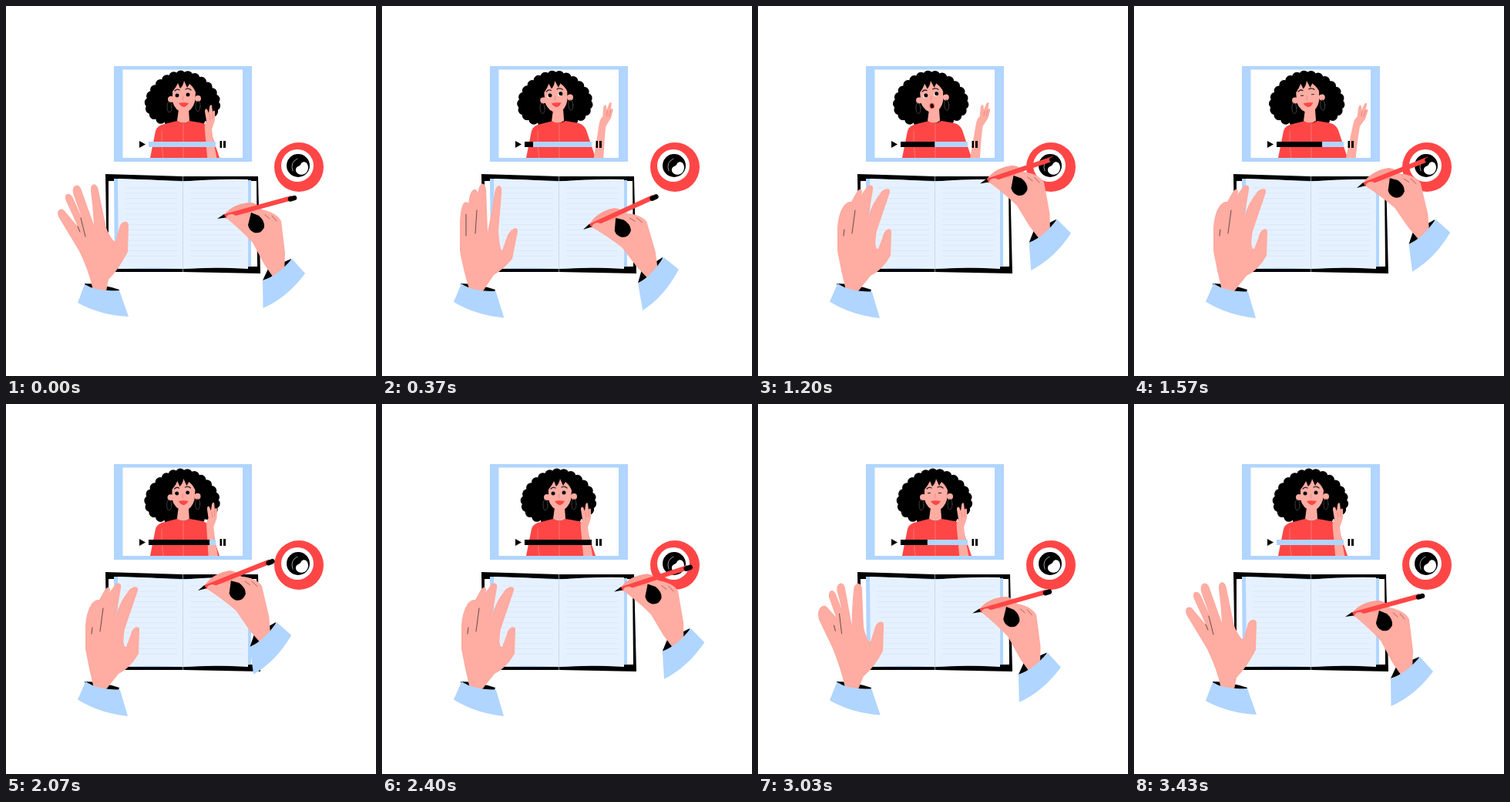
Animation, 480 px wide and 480 px high, one loop 3470 ms. Source, as an HTML page:

```html
<!DOCTYPE html>
<html lang="en">
<head>
<meta charset="utf-8">
<title>Online lesson</title>
<style>
  html, body { margin: 0; width: 100%; height: 100%; overflow: hidden; background: #fff; }
  svg { display: block; width: 100vw; height: 100vh; }
  .blue { fill: #b0d5ff; }
  .skin { fill: #ffaca2; }
  .shade { fill: #fb9f95; }
  .red { fill: #ff4646; }
  .white { fill: #fff; }
  .line { fill: none; stroke: #222; stroke-width: .7; stroke-linecap: round; }
</style>
</head>
<body>
<svg viewBox="0 0 480 480">
  <clipPath id="screen"><path d="M152 82.500H307V197H152Z"/></clipPath>

  <!-- video window -->
  <path class="blue" d="M140 78H319V202H140Z"/>
  <path class="white" d="M151.500 82.500H307V197H151.500Z"/>
  <g clip-path="url(#screen)">
    <g id="hair"></g>
    <path class="red" d="M187 197L194 162Q196 155 206 153L222 149Q230 154 238 149L255 152Q262 154 265 161L277 197Z"/>
    <path class="line" style="stroke:#ff8b85" d="M230 152V197M202 162Q201 180 204 197"/>
    <path id="neck" class="skin" d="M224 134H237L238 149Q230 154 222 149Z"/>
    <g id="head">
      <circle class="skin" cx="214" cy="121" r="4"/>
      <circle class="skin" cx="249" cy="120" r="4"/>
      <path class="skin" d="M216 111Q221 105 223 100L226 107Q230 103 231 97L235 106L238 101Q244 106 246 112L245 124Q242 136 231 139Q219 136 216 124Z"/>
      <path class="line" style="stroke-width:1.300" d="M219 110Q222 107 225 109M233 108Q237 106 240 109"/>
      <path class="line" style="stroke:#e8766f" d="M230 117Q228 122 230 122"/>
      <g id="eyes">
        <g class="white"><circle cx="222" cy="116" r="2.500"/><circle cx="236" cy="115" r="2.500"/></g>
        <g id="pupils"><circle cx="222" cy="116" r="2.500"/><circle cx="236" cy="115" r="2.500"/></g>
      </g>
      <path id="smile" class="red" d="M224 126Q230 124.500 237 126Q231 136 224 126Z"/>
      <ellipse id="talk" cx="230" cy="129.500" rx="2.700" ry="3.300" stroke="#ff4646"/>
      <g class="line" style="stroke:#555"><ellipse cx="212" cy="131" rx="3" ry="7"/><ellipse cx="249" cy="130" rx="3" ry="7"/></g>
    </g>
    <g id="arm" class="skin">
      <path d="M262 206L258 162Q257 152 260 149L258 137Q258 132 261 134L263 139L264 131Q265 127 267 129L268 137Q270 134 271 137L271 148Q269 154 267 160L269 174L275 206Z"/>
      <path class="line" style="stroke:#d9766f;stroke-width:.6" d="M264 140L265 147M268 138L268 146"/>
    </g>
  </g>
  <path d="M173 175L181 179.500L173 184ZM277.500 175H280V184H277.500ZM282 175H285V184H282Z"/>
  <path class="blue" d="M185 176H272V183H185Z"/>
  <rect id="progress" x="185" y="176" height="7"/>

  <!-- cup -->
  <circle class="red" cx="380" cy="209" r="32"/>
  <circle class="white" cx="378" cy="207" r="21"/>
  <circle cx="379" cy="207" r="15"/>
  <path class="white" d="M376 214C378 221 391 221 392 210C392 203 387 200 383 204C382 209 375 207 376 214Z"/>
  <path class="line" style="stroke:#fff;stroke-width:.6" d="M378 198Q368 203 372 214"/>

  <!-- notebook -->
  <path d="M129 218L229 221H327L330 347L230 345L131 345Z"/>
  <path class="white" d="M133 227H325L326 338L133 340Z"/>
  <path class="blue" d="M140 224L229 227L318 226V338L229 341L141 341Z"/>
  <path fill="#e6f1ff" d="M145 224Q190 225 229 228Q270 224 314 225V341Q270 338 229 341Q190 338 146 341Z"/>
  <path id="rules" class="line" style="stroke:#d9e4f2"/>
  <path class="line" style="stroke:#c3cedd" d="M229.500 221V345"/>

  <!-- resting hand -->
  <path d="M102 360Q122 360 147 368L144 376L105 368Z"/>
  <path id="palm" class="skin"/>
  <path id="creases" class="line"/>
  <path id="cuff" class="blue" d="M102 361Q118 371 147 369L159 403Q122 401 93 385Z"/>

  <!-- writing hand -->
  <g id="writer">
    <path d="M333 356L340 341L370 328L366 340L345 352Z"/>
    <path class="skin" d="M283 271Q295 256 318 255Q326 256 332 264Q351 268 357 279L362 320L361 347L346 351L335 335L320 307Q306 292 286 275Z"/>
    <path class="shade" d="M283 271Q295 256 318 255Q323 256 326 259L318 270L294 271Z"/>
    <path d="M318 268L328 272Q336 279 335 287Q331 296 322 294Q315 291 314 284Z"/>
    <path class="line" style="stroke:#8c4a45" d="M336 271L342 276M345 272L351 279"/>
    <path class="blue" d="M333 356Q352 350 371 328L388 347Q365 378 333.500 392Z"/>
    <path class="red" d="M283 270L370 246L371.500 252L285 275.500Z"/>
    <path d="M274 276L283 270L285 274.500Z"/>
    <path d="M369 250.500L374 249" stroke="#000" stroke-width="6.500" stroke-linecap="round"/>
    <path class="skin" d="M286 275Q286 270 294 270L308 277L306 291Z"/>
  </g>
</svg>
<script>
const LOOP = 3470;
const el = id => document.getElementById(id);
const set = (id, name, value) => el(id).setAttribute(name, value);
const clamp = u => Math.min(1, Math.max(0, u));
const ease = u => u * u * (3 - 2 * u);
const ramp = (t, from, to) => ease(clamp((t - from) / (to - from)));
const during = (t, from, to) => t >= from && t < to;
const lerp = (a, b, u) => a + (b - a) * u;

// Blends two paths that share the same commands.
function blend(a, b, u) {
  const ends = b.match(/[\d.]+/g);
  let i = 0;
  return a.replace(/[\d.]+/g, n => lerp(+n, +ends[i++], u).toFixed(2));
}

const spread = {
  palm: "M113 369Q108 345 95 318L69 275C63 264 73 260 77 267L93 286L78 253C74 242 83 241 87 249L98 274L87 243C85 231 95 229 98 239L114 284Q113 262 110 240C109 229 118 228 120 239L130 288Q138 306 142 305L147 288C149 278 160 277 159 286L158 319Q146 342 133 355L130 370Z",
  creases: "M93 286L96 293M97 275L103 299"
};
const closing = {
  palm: "M113 367Q106 345 101 318L101 282C102 258 106 252 111 255L112 256L113 249C115 238 121 235 123 240L124 242L125 238C127 228 134 227 135 240L137 293Q143 264 146 242C148 230 156 230 155 242L151 292Q153 318 156 317L162 300C167 287 177 285 176 293L169 328Q157 342 145 349L131 370Z",
  creases: "M109 270L109 298M123 265L121 295"
};
const resting = {
  palm: "M114 369Q108 345 103 318L103 290C104 268 111 255 119 254L121 254L126 245C130 237 135 235 135 242L134 245L139 238C143 230 151 231 149 239L140 292Q143 262 158 244C162 236 173 235 171 242L154 292Q150 316 156 315L162 299C164 288 174 286 173 294L172 324Q161 343 146 350L130 370Z",
  creases: "M112 290L111 298M126 265L122 295"
};

// Pencil tip: time, x, y, turn, half strokes written until the next stop
const stops = [
  [0, 274, 276, 0, 0], [370, 261, 290, -9.2, 0], [830, 242, 229, -3.8, 6],
  [1400, 306, 232, -4, 0], [1570, 289, 236, -6.4, 0], [2070, 249, 242, -6.3, 5],
  [2520, 312, 246, -4, 0], [2730, 286, 263, -1.5, 0], [3230, 274, 276, 0, 0], [LOOP, 274, 276, 0, 0]
];

function drawWriter(t) {
  const i = stops.findIndex((s, k) => t < stops[k + 1][0]);
  const [from, to] = [stops[i], stops[i + 1]];
  const u = (t - from[0]) / (to[0] - from[0]);
  const [x, y, turn] = [1, 2, 3].map(k => lerp(from[k], to[k], ease(u)));
  const stroke = Math.sin(Math.PI * from[4] * u);
  set("writer", "transform", `translate(${x - 274} ${y - 276 + 2 * stroke}) rotate(${turn - 2 * stroke} 274 276)`);
}

function drawPalm(t) {
  const shut = ramp(t, 0, 580), open = ramp(t, 2550, 3300);
  for (const part of ["palm", "creases"]) {
    const [s, c, r] = [spread[part], closing[part], resting[part]];
    set(part, "d", open > 0 ? blend(r, s, open)
      : shut < .7 ? blend(s, c, shut / .7) : blend(c, r, (shut - .7) / .3));
  }
  set("cuff", "transform", `rotate(${3 * (shut - open)} 120 385)`);
}

function drawTeacher(t) {
  const tilt = ramp(t, 0, 420) - ramp(t, 1600, 2180);
  const wave = 16.5 + 2 * Math.cos((t - 830) * 2 * Math.PI / 920);
  set("head", "transform", `translate(${-2.5 * tilt} 0) rotate(${-5 * tilt} 230 150)`);
  set("hair", "transform", `translate(${-5 * tilt} 0) rotate(${-2 * tilt} 229 121)`);
  set("neck", "transform", `translate(${-2 * tilt} 0)`);
  set("arm", "transform", `translate(${15 * tilt} ${-5 * tilt}) rotate(${wave * tilt} 268 197)`);
  const blink = during(t, 1500, 1640) || during(t, 2900, 3040);
  set("eyes", "transform", `translate(0 115.500) scale(1 ${blink ? .2 : 1}) translate(0 -115.500)`);
  set("pupils", "transform", `translate(${1.3 * tilt} ${-.7 * tilt})`);
  const talking = during(t, 560, 1360);
  set("talk", "visibility", talking ? "visible" : "hidden");
  set("smile", "visibility", talking ? "hidden" : "visible");
  set("progress", "width", 87 * clamp((t - 95) / 2175) * (1 - ramp(t, 2770, 3230)));
}

// Curls sit on an oval that widens towards the shoulders.
const curls = Array.from({ length: 23 }, (_, i) => {
  const a = i / 23 * 2 * Math.PI;
  return [229 + 42 * Math.cos(a) * (1 + .2 * Math.sin(a)), 121 + 31 * Math.sin(a)];
});
el("hair").innerHTML = `<path d="M${curls.join("L")}Z"/>` +
  curls.map(([x, y]) => `<circle cx="${x}" cy="${y}" r="6.5"/>`).join("");
set("rules", "d", Array.from({ length: 14 }, (_, i) => `M155 ${236 + 6.8 * i}h67m17 0h67`).join(""));

function frame() {
  const t = performance.now() % LOOP;
  drawTeacher(t);
  drawPalm(t);
  drawWriter(t);
  requestAnimationFrame(frame);
}
frame();
</script>
</body>
</html>
```
